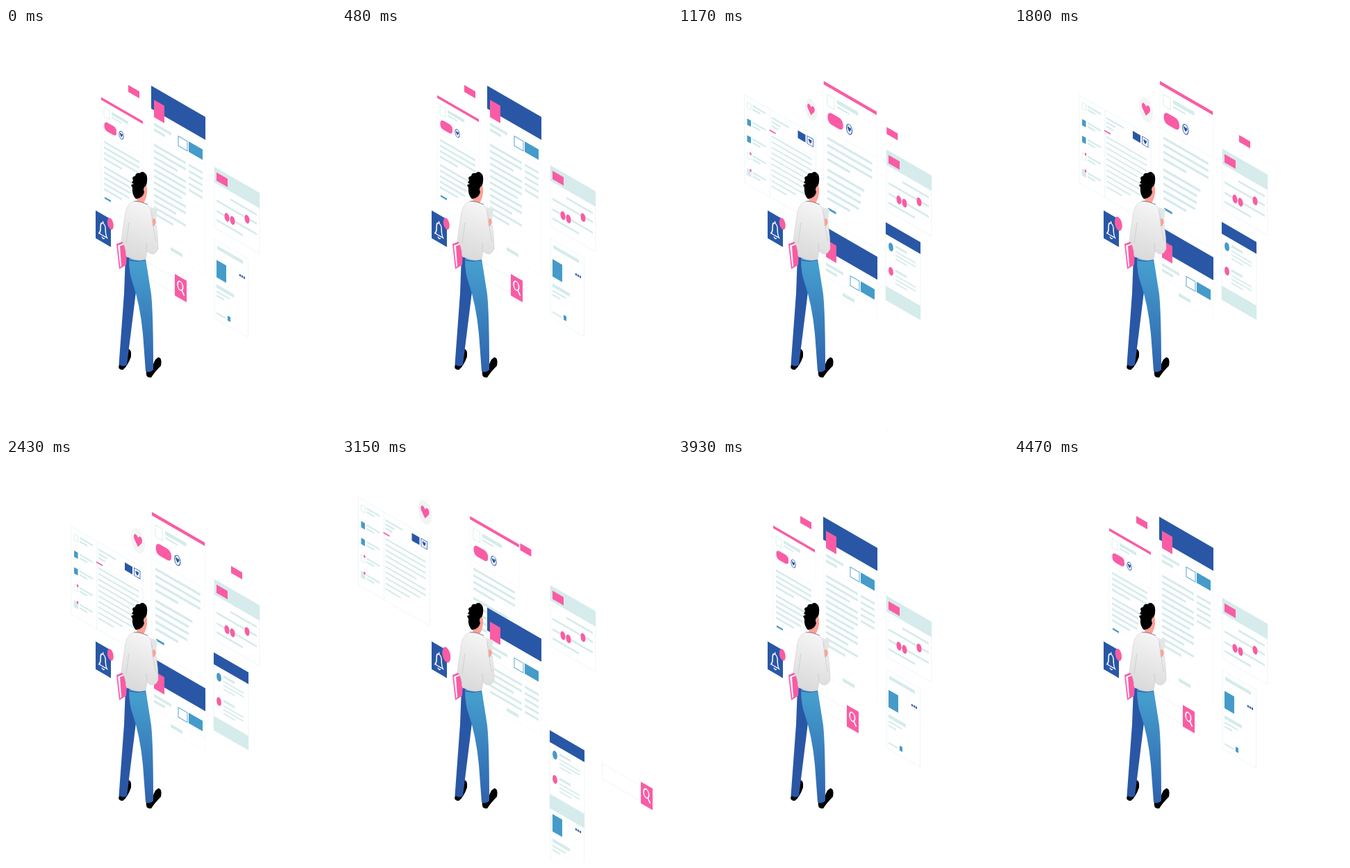
These frames come from a looping animation (475 by 580 pixels, 4.5 s). An HTML page with a canvas:

```html
<!DOCTYPE html>
<html lang="en">
<head>
<meta charset="utf-8">
<style>
  html, body { margin: 0; width: 100%; height: 100%; overflow: hidden; background: #fff; }
  canvas { display: block; }
</style>
</head>
<body>
<canvas id="stage" width="475" height="580"></canvas>
<script>
const ctx = document.getElementById('stage').getContext('2d');
const LOOP = 4500, SLOPE = Math.tan(Math.PI / 6);
const BLUE = '#2957a6', SKY = '#459bc9', PINK = '#f95ca4', PALE = '#d6ebeb', EDGE = '#edf6f6', FAINT = '#f8fbfb', SKIN = '#ffa096';

const mix = (a, b, k) => a + (b - a) * k;
function ease(p) {
  p = Math.min(1, Math.max(0, p));
  return p < .5 ? 4 * p ** 3 : 1 - 4 * (1 - p) ** 3;
}

// Drawing helpers; everything after plane() lies on the slanted wall.
function plane(x, y, s = 1) { ctx.setTransform(s, s * SLOPE, 0, s, x, y); }
function bar(x, y, w, h, color = PALE) {
  ctx.fillStyle = color;
  ctx.fillRect(x, y, w, h);
}
function frame(x, y, w, h, color = EDGE, width = 1) {
  bar(x, y, w, h, '#fff');
  ctx.strokeStyle = color;
  ctx.lineWidth = width;
  ctx.strokeRect(x, y, w, h);
}
function rows(x, y, step, h, widths) {
  widths.forEach((w, i) => bar(x, y + i * step, w, h));
}
function oval(x, y, rx, ry, fill, stroke) {
  ctx.beginPath();
  ctx.ellipse(x, y, rx, ry, 0, 0, 7);
  if (fill) { ctx.fillStyle = fill; ctx.fill(); }
  if (stroke) { ctx.strokeStyle = stroke; ctx.stroke(); }
}
function shape(d, fill, stroke, width = 1) {
  const path = new Path2D(d);
  if (fill) { ctx.fillStyle = fill; ctx.fill(path); }
  if (stroke) { ctx.strokeStyle = stroke; ctx.lineWidth = width; ctx.stroke(path); }
}
function heart(x, y, s, color) {
  ctx.save();
  ctx.translate(x, y);
  ctx.scale(s, s * 1.4);
  shape('M0 1L-.8 .1C-1.35 -.6 -.5 -1.4 0 -.5C.5 -1.4 1.35 -.6 .8 .1Z', color);
  ctx.restore();
}
function shade(x0, y0, x1, y1, from, to) {
  const g = ctx.createLinearGradient(x0, y0, x1, y1);
  g.addColorStop(0, from);
  g.addColorStop(1, to);
  return g;
}

function inbox(x, y) {
  plane(x, y);
  frame(0, 0, 37, 126);
  frame(37, 0, 66, 126);
  for (let i = 0; i < 5; i++) {
    const top = 8 + i * 24;
    if (i == 1 || i == 2) bar(4, top, 5.5, 9, SKY);
    else frame(4, top, 5.5, 9, PALE, .7);
    if (i == 4) bar(4, top, 5.5, 9);
    if (i > 2) oval(9, top, 1.3, 2, PINK);
    rows(12, top, 5, 2.6, [19, 11]);
  }
  rows(39, 9, 6, 2.6, [25, 13, 10]);
  bar(37, 31, 66, .6, EDGE);
  bar(36, 29, 9, 2, PINK);
  bar(77, 7, 11, 11, BLUE);
  frame(90.5, 7, 8.5, 11, BLUE, .8);
  heart(94.7, 12.5, 2.4, BLUE);
  rows(39, 36, 8, 2.4, [58, 58, 58, 58, 45, 58, 58, 50, 35, 22]);
}

function bubble(x, y, s) {
  plane(x, y, s);
  oval(0, 0, 10, 17, '#f4f4f4');
  heart(0, 0, 6.2, PINK);
}

function profile(x, y, s) {
  plane(x, y, s);
  frame(0, 0, 60, 155, FAINT);
  bar(0, -.6, 60, 4, PINK);
  frame(4, 12, 8, 13, PALE, .7);
  bar(15, 12, 24, 4.5);
  bar(15, 19, 14, 2);
  ctx.fillStyle = PINK;
  ctx.beginPath();
  ctx.roundRect(4.5, 31, 17.5, 13, 5);
  ctx.fill();
  ctx.lineWidth = .8;
  oval(29, 37.5, 3.2, 5.5, '#fff', BLUE);
  heart(29, 37.5, 2.1, BLUE);
  bar(0, 52, 60, .6, EDGE);
  rows(4, 60, 8, 3, [51, 51, 51, 26]);
  rows(4, 96, 8, 3, [42, 38, 38, 36, 26]);
  bar(5, 140, 9, 2.6, SKY);
}

function article(x, y, h) {
  plane(x, y);
  frame(0, 0, 78, h, FAINT);
  ctx.save();
  ctx.beginPath();
  ctx.rect(0, 0, 78, h - 18);
  ctx.clip();
  rows(4, 80, 9, 3.4, [46, 46, 34, 46, 46, 46, 40, 46, 46, 32, 46, 28]);
  rows(54, 80, 9, 3.4, [20, 20, 20, 20, 20]);
  ctx.restore();
  bar(0, -1, 78, 33, BLUE);
  bar(4, 17, 15, 25, PINK);
  rows(4, 50, 8, 4, [25, 16]);
  frame(39, 49, 13, 14, SKY, .9);
  bar(54, 48, 20, 15, SKY);
  bar(0, 70, 78, .6, EDGE);
  bar(28, h - 11, 17, 5);
}

function settings(x, y) {
  plane(x, y);
  frame(0, 0, 65, 87);
  bar(0, 0, 65, 22);
  bar(3, 6, 16, 12, PINK);
  bar(23, 32, 38, 3);
  bar(3, 45, 58, 3);
  bar(3, 60, 58, 3);
  bar(3, 73, 38, 3);
  oval(18, 62, 3.5, 6, PINK);
  oval(26, 62, 3.5, 6, PINK);
  oval(47, 48, 3.5, 6, PINK);
}

function card(x, y) {
  plane(x, y);
  frame(0, 0, 48.5, 113);
  bar(4, 7, 37, 5);
  bar(3, 28, 14, 25, SKY);
  for (let i = 0; i < 3; i++) oval(37 + i * 3, 30.5, 1.2, 1.7, BLUE);
  bar(3, 63, 25, 5);
  bar(3, 72, 19, 2.4);
  bar(3, 78, 11, 2.4);
  bar(3, 103, 13, 2.4);
  bar(19, 99, 4, 7, SKY);
}

function chat(x, y) {
  plane(x, y);
  frame(0, 0, 50, 111);
  bar(0, -1, 50, 17, BLUE);
  [SKY, PINK].forEach((color, i) => {
    const top = 24 + i * 35;
    oval(7.5, top + 6.5, 3.4, 6, color);
    bar(14, top, 16, 3.6);
    rows(14, top + 8, 5.5, 2, [29, 29, 17]);
  });
  bar(0, 90.5, 50, 20.5);
}

function search(x, y) {
  plane(x, y);
  frame(-56, 6, 56, 22, '#f3f3f3');
  bar(0, 0, 17, 31, PINK);
  ctx.lineWidth = 1.6;
  oval(7.8, 12.5, 3.8, 6.3, null, '#fff');
  shape('M10 17.5L13.5 23.5', null, '#fff', 2);
}

function bell(pulse) {
  plane(129, 262.5);
  bar(0, 0, 22, 40, BLUE);
  shape('M5 30Q7.2 27 7.2 19Q7.2 12.5 10.7 12.5Q14.2 12.5 14.2 19Q14.2 27 16.5 30ZM10.7 12.5V9.5M9 32.5Q10.7 36 12.5 32.5', null, '#fff', 1.5);
  oval(21.3, 7, 4.5 * pulse, 8 * pulse, PINK);
}

function man() {
  ctx.setTransform(1, 0, 0, 1, 0, 0);
  shape('M163 484Q160 492 168 492Q175 487 180 473Q181 461 175 462L173 484Z', '#000');
  shape('M202 493Q200 504 209 503Q214 495 223 486Q225 474 219 474Q212 478 211 490Z', '#000');
  shape('M172 329L170 382L162.5 484Q168 489 174 485L188 372L190 333Z', BLUE);
  shape('M177 332L201 332L209 383Q212 412 212 492Q207 497 201 494L197 440Q193 398 182 366Q177 352 177 332Z',
    shade(206, 345, 192, 492, '#449dcd', '#2f63ae'));
  shape('M177 334Q189 337 201 334', null, BLUE, 1);
  shape('M159 311L175 304L173 341L163 347Z', PINK);
  shape('M161 313L174 308L173 310L164 314L166 343L164.5 344Z', '#fff');
  shape('M208 258L218 261L216 276L211 277Z', '#e3e6e6');
  shape('M210 276Q215 271 216 280L213 287L209 285Z', SKIN);
  shape('M182 250Q173 255 171 271L166 306Q172 312 173 328Q186 337 201 333L203 321Q213 331 219 318Q219 300 216 284L211 285Q211 263 206 257Q198 248 182 250Z',
    shade(205, 255, 178, 332, '#f5f5f5', '#d9d9d9'), '#d2d2d2', .7);
  shape('M209 264Q213 296 216 307M203 321L202 309M177 280L173 310', null, '#c8c8c8', .7);
  shape('M197 226Q204 222 203 237Q202 246 198 252L188 249L191 236Z', SKIN);
  shape('M184 224L181 223L183 219Q180 214 186 213Q187 208 192 209Q197 205 200 209Q204 211 203 221Q203 226 199 229Q197 232 199 236Q197 245 187 246Q181 240 182 230L180 226Z', '#000');
  shape('M184 249Q194 249 204 254', null, '#6a6e80', .8);
}

function draw(t) {
  const a = ease((t - 629) / 600), b = ease((t - 2884) / 600), k = a - b;
  const tagIn = ease((t - 500) / 1020), tag = tagIn - ease((t - 2860) / 600);
  const sway = (1 + Math.cos(t * Math.PI * 4 / LOOP)) / 2;
  const pulse = 1 + .35 * Math.max(0, -Math.sin(t * Math.PI * 8 / LOOP));
  const slide = 413 * (1 - a) - 200 * b;
  const find = b > 0 ? 289 * (1 - b) : -280 * a;

  ctx.setTransform(1, 0, 0, 1, 0, 0);
  bar(0, 0, 475, 580, '#fff');

  inbox(94 + slide, 95 + slide * .57 + 2.5 * sway);
  bubble(190 + slide, 117 + slide * .57 + sway, .25 + .75 * tagIn);
  profile(137 + 73 * k, mix(93 + 7 * sway, 77, k), 1 + .27 * k);
  article(209, 84 + 202 * k, 226 - 136 * k);
  plane(176 + 148 * tag, 82 + 72 * tag);
  bar(0, 0, 16, 10, PINK);
  settings(300, mix(194 + 6 * sway, 175 - 2 * sway, k));
  card(300, 301 + 3 * sway + 278 * k);
  chat(299, 282 - 3 * sway - 439 * (1 - a) + 311 * b);
  search(243 + find, 354 + find * .59);
  bell(pulse);
  man();
}

function tick() {
  draw(performance.now() % LOOP);
  requestAnimationFrame(tick);
}
tick();
</script>
</body>
</html>
```
